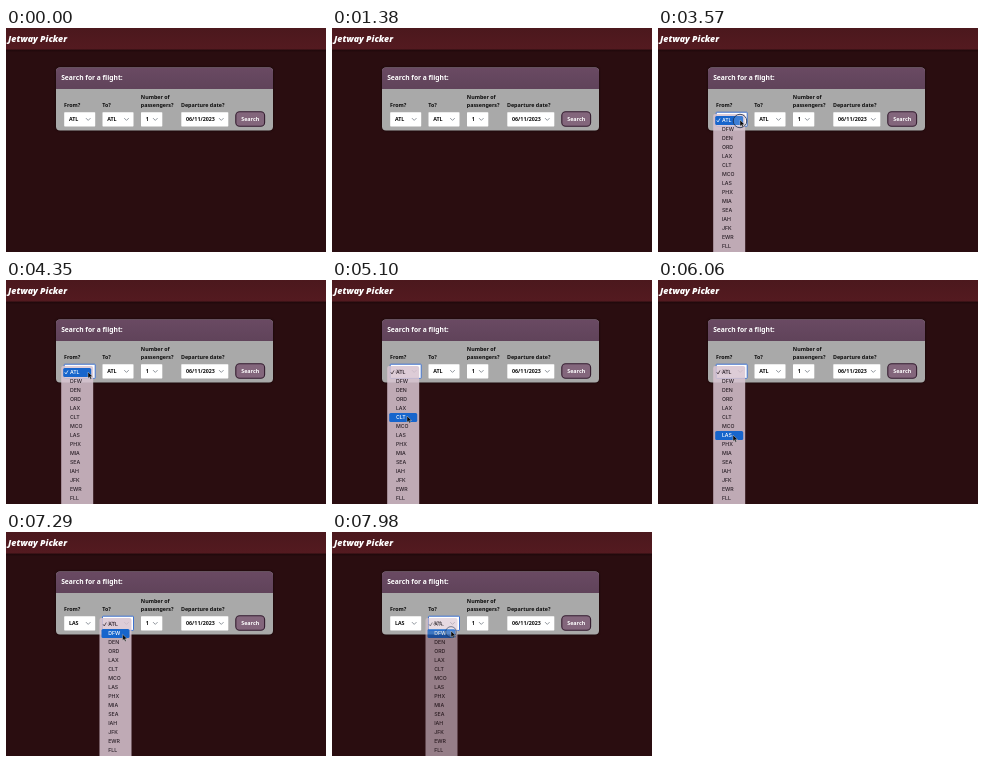
These frames come from a looping animation (320x224 px, 8 s). An HTML page:

```html
<!DOCTYPE html>
<html lang="en">
<head>
<meta charset="utf-8">
<title>Flight search</title>
<style>
  html, body { margin: 0; width: 100%; height: 100%; overflow: hidden; background: #2a0d10; }
  svg { display: block; width: 100%; height: 100%; }
  text { font: 600 5.35px "Noto Sans", sans-serif; fill: #0c0c0c; }
  .title { font: italic 800 8.8px "Open Sans", sans-serif; fill: #fff; }
  .heading { font-size: 6.7px; fill: #fff; }
  .light { fill: #fff; }
  .middle { text-anchor: middle; }
  .card { filter: drop-shadow(0 .5px 1px #0009); }
  .menu text { font: 500 5.25px Inter, sans-serif; fill: #2a2028; }
  .menu text.on { fill: #fff; }
  .line { fill: none; stroke-linecap: round; stroke-linejoin: round; }
</style>
</head>
<body>
<svg viewBox="0 0 320 224">
  <defs>
    <linearGradient id="bar" x2="0" y2="1">
      <stop stop-color="#4b181d"/><stop offset="1" stop-color="#541a20"/>
    </linearGradient>
    <linearGradient id="barShadow" x2="0" y2="1">
      <stop stop-color="#1d080a"/><stop offset="1" stop-color="#2a0d10"/>
    </linearGradient>
    <linearGradient id="cardHead" x2="0" y2="1">
      <stop stop-color="#6a4a63"/><stop offset="1" stop-color="#60435a"/>
    </linearGradient>
    <clipPath id="cardShape"><rect x="50" y="39.5" width="217" height="63" rx="4"/></clipPath>
  </defs>

  <rect width="320" height="224" fill="#2a0d10"/>
  <rect y="21.5" width="320" height="3" fill="url(#barShadow)"/>
  <rect width="320" height="21.5" fill="url(#bar)"/>
  <text class="title" x="2" y="14.2">Jetway Picker</text>

  <g class="card">
    <g clip-path="url(#cardShape)">
      <rect x="50" y="39" width="218" height="65" fill="#a9a9a9"/>
      <rect x="50" y="39" width="218" height="22" fill="url(#cardHead)"/>
    </g>
  </g>
  <text class="heading" x="55.2" y="52.1">Search for a flight:</text>
  <text x="58" y="79.2">From?</text>
  <text x="96.3" y="79.2">To?</text>
  <text x="134.8" y="71">Number of</text>
  <text x="134.8" y="79.2">passengers?</text>
  <text x="175" y="79.2">Departure date?</text>
  <g id="fields"></g>
  <rect x="229.8" y="83.8" width="28.8" height="14.4" rx="3.8" fill="#83667c" stroke="#351d30" stroke-width="1.1"/>
  <text class="light middle" x="244.2" y="93">Search</text>

  <g id="menus"></g>
  <circle id="ripple" r="7" fill="#fff" fill-opacity=".18" stroke="#20304c" stroke-width=".9"/>
  <path id="cursor" d="M0 0V6.2L1.5 4.9L2.5 7.2L3.6 6.7L2.6 4.5H4.6Z" fill="#080808" stroke="#ddd" stroke-width=".4"/>
</svg>

<script>
const DURATION = 8000;
const AIRPORTS = 'ATL DFW DEN ORD LAX CLT MCO LAS PHX MIA SEA IAH JFK EWR FLL'.split(' ');
const ROW = 9, FIRST_ROW = 92.5;
const RIPPLE_TIME = 330, FADE_TIME = 150;
const FROM_OPEN = 3540, FROM_CLOSE = 6200, TO_OPEN = 6690, TO_CLOSE = 7940;

// time, x, y of the pointer tip
const PATH = [
  [2520, 118, 226], [3030, 84, 94], [3180, 82, 92], [4350, 82, 92],
  [4710, 76, 145], [4860, 76, 145], [5100, 75, 136], [5640, 75, 155],
  [6200, 75, 155], [6480, 116, 95], [7170, 116, 95], [7500, 118, 119],
  [7680, 118, 119], [7860, 119, 99]
];
const CLICKS = [3540, 6110, 6660, 7860];

const byId = id => document.getElementById(id);
const clamp = v => Math.max(0, Math.min(1, v));

function add(parent, tag, attributes, content = '') {
  const node = document.createElementNS('http://www.w3.org/2000/svg', tag);
  for (const key in attributes) node.setAttribute(key, attributes[key]);
  node.textContent = content;
  parent.append(node);
  return node;
}

function addField(x, width, value) {
  const group = byId('fields');
  const box = add(group, 'rect', { x, y: 84.2, width, height: 14.2, rx: .6, fill: '#fff', 'stroke-width': 1 });
  const label = add(group, 'text', { x: x + 4.7, y: 93.2 }, value);
  add(group, 'path', {
    class: 'line', d: `M${x + width - 9} 90.4l2 2l2-2`, stroke: '#747b84', 'stroke-width': .8
  });
  return { box, label };
}

function addMenu(x) {
  const group = add(byId('menus'), 'g', { class: 'menu' });
  add(group, 'rect', { x, y: 86, width: 32, height: 145, rx: 2, fill: '#d8c4d1', 'fill-opacity': .86 });
  const highlight = add(group, 'rect', { x: x + 2, width: 28, height: ROW, rx: 1.5, fill: '#1765cc' });
  const labels = AIRPORTS.map((name, i) =>
    add(group, 'text', { x: x + 8.7, y: FIRST_ROW + 1.9 + i * ROW }, name));
  const check = add(group, 'path', {
    class: 'line', d: `M${x + 3.8} 92.6l1 1.4l1.8-3.2`, 'stroke-width': .7
  });
  return { group, highlight, labels, check };
}

const from = addField(58.2, 31, 'ATL');
const to = addField(96.5, 31, 'ATL');
addField(135, 21.3, '1');
addField(175.3, 47, '06/11/2023');
const fromMenu = addMenu(55.2);
const toMenu = addMenu(93.5);

function pointerAt(time) {
  const next = PATH.findIndex(point => point[0] > time);
  if (next === 0) return PATH[0].slice(1);
  if (next < 0) return PATH[PATH.length - 1].slice(1);
  const [t0, x0, y0] = PATH[next - 1], [t1, x1, y1] = PATH[next];
  const p = (time - t0) / (t1 - t0), eased = p * p * (3 - 2 * p);
  return [x0 + (x1 - x0) * eased, y0 + (y1 - y0) * eased];
}

function focus(field, active) {
  field.box.setAttribute('stroke', active ? '#3f72cf' : 'none');
}

function showMenu(menu, time, open, close) {
  const opacity = time < open ? 0 : 1 - clamp((time - close) / FADE_TIME);
  const row = Math.round((pointerAt(Math.min(time, close))[1] - FIRST_ROW) / ROW);
  menu.group.setAttribute('opacity', opacity);
  menu.highlight.setAttribute('y', FIRST_ROW - ROW / 2 + row * ROW);
  menu.labels.forEach((label, i) => label.classList.toggle('on', i === row));
  menu.check.setAttribute('stroke', row === 0 ? '#fff' : '#2a2028');
}

function draw(time) {
  const [x, y] = pointerAt(time);

  focus(from, time >= FROM_OPEN && time < TO_OPEN);
  focus(to, time >= TO_OPEN);
  from.label.textContent = time < FROM_CLOSE ? 'ATL' : 'LAS';
  showMenu(fromMenu, time, FROM_OPEN, FROM_CLOSE);
  showMenu(toMenu, time, TO_OPEN, TO_CLOSE);

  const click = CLICKS.find(start => time >= start && time < start + RIPPLE_TIME);
  const age = click === undefined ? 1 : (time - click) / RIPPLE_TIME;
  const [rx, ry] = pointerAt(click ?? 0);
  const ripple = byId('ripple');
  ripple.setAttribute('cx', rx);
  ripple.setAttribute('cy', ry + 1);
  ripple.setAttribute('r', 7.2 * (1 - age * .7));
  ripple.setAttribute('opacity', 1 - age);
  byId('cursor').setAttribute('transform', `translate(${x} ${y})`);
}

function frame() {
  draw(performance.now() % DURATION);
  requestAnimationFrame(frame);
}
frame();
</script>
</body>
</html>
```
